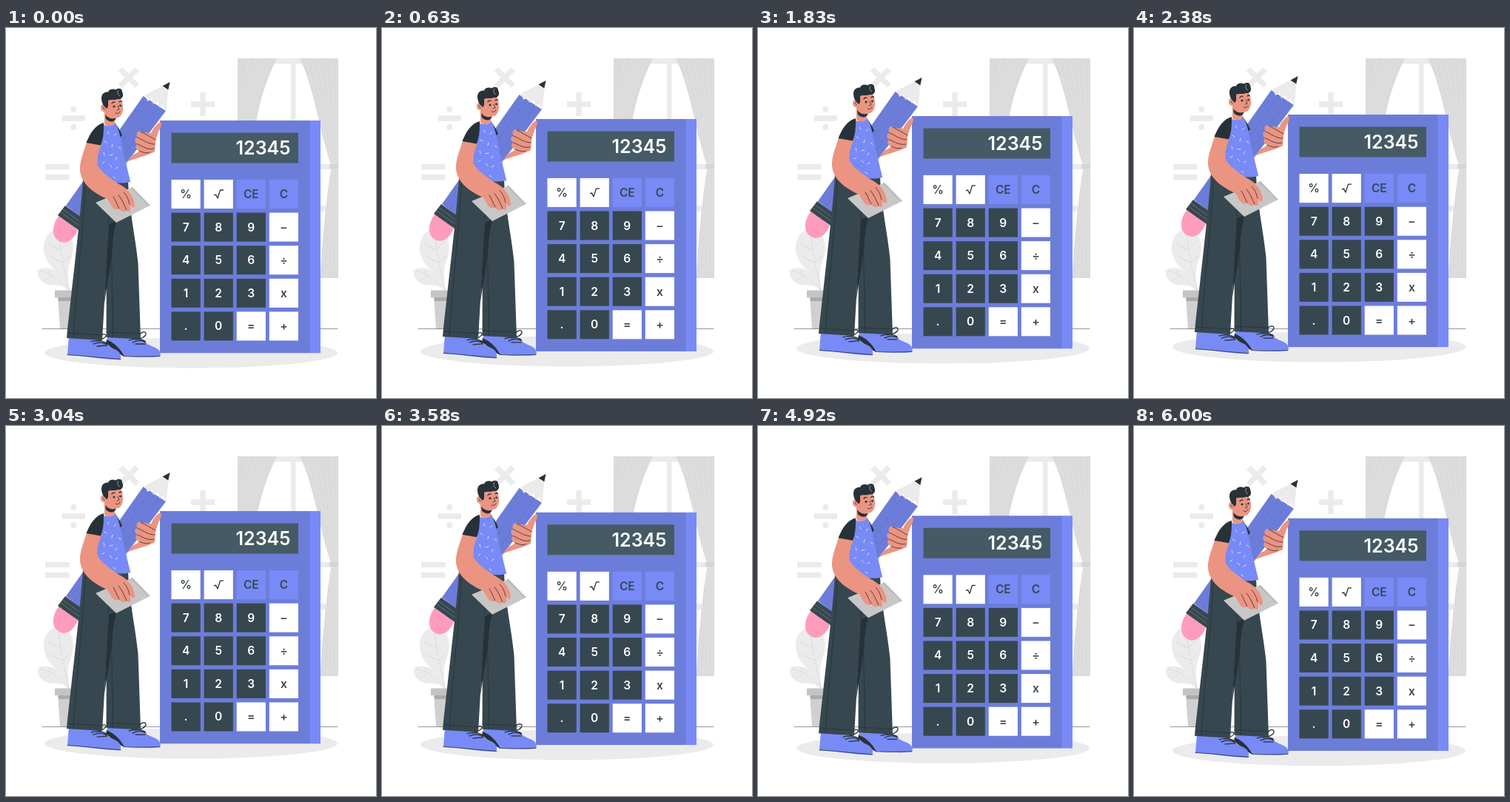
Animation, 500 px wide and 500 px high, one loop 6.04 s. Source, as an HTML page:

```html
<!DOCTYPE html>
<html lang="en">
<head>
<meta charset="utf-8">
<title>Calculator</title>
<style>
html, body { margin: 0; width: 100%; height: 100%; overflow: hidden; background: #fff; }
svg { display: block; width: 100vw; height: 100vh; }
text { font-family: Inter, Lato, sans-serif; font-weight: 600; }
.blue { fill: #788af6; } .shade { fill: #6c7dd9; }
.dark { fill: #37474f; } .ink { fill: #263238; }
.skin { fill: #eb9481; }
.line { fill: none; stroke: #263238; stroke-width: .8; stroke-linecap: round; stroke-linejoin: round; }
.thin { stroke-width: .5; } .bold { stroke-width: 1.3; }
.pale { fill: none; stroke: #e3e3e3; stroke-width: .8; }
.vein { fill: none; stroke: #d9d9d9; stroke-width: .8; }
</style>
</head>
<body>
<svg viewBox="0 0 500 500">
  <!-- window -->
  <path fill="#ebebeb" d="M360 41H400V48.500H391.500V126H385V48.500H360ZM424 240H436V248H424ZM424 184H449V191H424Z"/>
  <path fill="#dbdbdb" d="M313 41H366C354 65 343 96 338 128L330 180H313ZM397 41H449V338H425C427 293 433 225 440 187C426 151 416 78 397 41Z"/>
  <path class="pale" d="M361 42C346 66 336 98 331 130M354 42C341 68 331 100 326 130M346 42C334 68 326 100 322 130M337 42C328 70 322 100 318 130M328 42L316 115M404 42C419 82 428 150 441 187M412 42C425 82 431 150 443 187M421 42C430 82 436 150 444 187M430 42C436 82 440 150 446 187M440 42L448 187M441 188C436 230 431 290 429 337M443 188C440 235 436 290 434 337M445 188C443 235 441 290 440 337M447 188L445 337"/>
  <path fill="#d5d5d5" d="M437 184H449V190H437Z"/>

  <!-- signs on the wall -->
  <g stroke="#ebebeb" stroke-width="7.500" fill="#ebebeb">
    <path d="M154.500 56L177.500 78M177 55.500L154.500 78.500M250 103H282M266 87V119M75.500 122H107M53 187.500H85.500M53 201.500H85.500"/>
    <g stroke="none"><circle cx="91.300" cy="109.800" r="4"/><circle cx="91.300" cy="134" r="4"/></g>
  </g>

  <!-- plant -->
  <path fill="#ebebeb" d="M84 354C79 330 59 327 53 309C47 290 55 273 72 271C92 274 95 297 86 318C82 330 84 342 86 354Z"/>
  <path fill="#ebebeb" d="M84 354C77 345 63 350 52 345C44 341 41 331 44 326C58 321 74 328 80 341Z"/>
  <path class="vein" d="M71 277C73 304 80 330 85 355M73 300L57 291M74 299L86 287M77 317L59 309M77 317L88 306M46 328C61 331 76 342 84 354M60 334L58 327M62 335L54 340"/>
  <path fill="#d0d0d0" d="M70 362H99L97 406.500H73Z"/>
  <path fill="#ababab" d="M70 362H99V369H71Z"/>
  <path fill="#c4c4c4" d="M66 354.500H101V364H66Z"/>
  <path class="line thin" d="M49 406.500H448"/>

  <g id="rise">
    <ellipse cx="250" cy="439" rx="198" ry="20.500" fill="#ebebeb"/>

    <!-- calculator -->
    <path class="shade" d="M208 125H411V439.200H208Z"/>
    <path class="blue" d="M410.500 125H425V439.200H410.500Z"/>
    <path fill="#455a64" d="M223.500 141.500H395V182.500H223.500Z"/>
    <text x="384.500" y="171.200" font-size="25" text-anchor="end" fill="#fff">12345</text>
    <g id="keys"></g>
    <path class="line bold" d="M281.500 226L283.500 225L286 230L289.500 219H293.500"/>

    <!-- pencil -->
    <path fill="#ff9cbd" d="M73 252C64 261 61 276 67 284C75 293 88 293 97 273Z"/>
    <path class="shade" d="M185.500 92L216 112L105 259L81 240Z"/>
    <path fill="none" stroke="#6170c6" stroke-width=".7" d="M196 98L92 247M207 106L99 255"/>
    <path fill="#ebebeb" d="M187 91L212 78L219.500 83L216.500 112L212 104L207.500 107.500L205 99.500L199 103L197 95.500L191.500 99Z"/>
    <path class="ink" d="M221.500 73L211.500 78.300L219.300 83.500Z"/>
    <path class="dark" d="M80 240L106 259L98 273L70 253Z"/>
    <path fill="none" stroke="#6f7e85" stroke-width=".8" d="M77 245L103 264M74 249L100 268"/>

    <!-- shoes -->
    <path class="blue" d="M137 418H179C186 425 194 429 202 432C208 435 210 440 208 444C190 446 170 444 157 443L136 424Z"/>
    <path class="ink" d="M136 421C145 425 154 432 160 444L151 439L135 426Z"/>
    <path class="blue" d="M85 416L83 442C107 443 131 448 154 448.500C157 443 154 437 147 434C138 430 130 425 126 418Z"/>
    <path class="line" d="M83 441.500C107 443 130 446 155 447.500M159 443.500C175 444.500 193 444 208 443.500"/>
    <path class="line bold" d="M115 424C124 421 133 423 136 427M118 427C126 424 133 425 137 429M123 430L136 429M124 420C128 412 136 413 135 416C133 421 126 422 122 423M166 422C174 419 183 420 188 423M171 425C178 421 185 422 189 425M175 427L188 427M179 419C181 409 190 409 189 414C187 419 181 420 175 421"/>

    <!-- trousers -->
    <path class="dark" d="M134 206L165 207C166 244 175 283 178.500 318L182 420.500L135.500 418L136 300Z"/>
    <path class="ink" d="M137 258L149 262C142 287 144 315 137 345L133 372Z"/>
    <path class="dark" d="M104 205H164L166 248L146 262L139 265L130 422L82 419C95 300 100 260 104 205Z"/>
    <path class="line" d="M107 213C104 280 95 350 91 418M84 412L130 415M136 411L181 413M146 264C139 306 146 360 144 418M139 262V245"/>

    <!-- torso -->
    <path class="ink" d="M146 128C151 132 154 138 157 145L150 151Z"/>
    <path class="blue" d="M131 130C137 134 145 132 148 128C156 144 157 165 162 183L168 208C156 211 137 209 124 206L123 174Z"/>
    <path fill="none" stroke="#e5e9ff" stroke-width=".9" stroke-linecap="round" d="M137 140l2 3M146 145l3-2M133 153l3 2M144 157l-1 4M152 161l3 2M132 168l1 4M140 172l4-1M150 175l-2 3M157 185l1 4M130 183l3-2M140 185l3 3M148 190l3-2M135 198l-1 3M145 201l3 2M157 199l3-2M127 194l2 2"/>

    <!-- head -->
    <path class="skin" d="M133 108V130C138 134 145 132 147.500 128L146 122Z"/>
    <path class="ink" d="M134 117C138 122 144 124 149 121C147 128 140 128 135 123Z"/>
    <path class="skin" d="M136 98L154 94C158 100 159 108 157.500 113C156 120 151 122 146 122C141 121 136 118 134 113C129 114 127 109 128.500 105C131 102 134 103 136 106Z"/>
    <path class="ink" d="M132 105C127 96 128 86 138 86.500C139 82.500 145 81.500 148 83.500C152 80.500 157 81.500 157 86C160 93 156 97 151 96C146 98 141 96 138 98C138 103 139 107 136 109Z"/>
    <path fill="none" stroke="#fff" stroke-width=".5" d="M152 84C150 87 151 91 154 92"/>
    <path class="line bold" d="M143 102Q145 99 147 100.500M153 100Q155 98 156.500 99.500"/>
    <path class="line" d="M151 105L153 110L150 111M148 115Q152 117 154 113M131 107L133 110"/>
    <circle class="ink" cx="146" cy="106" r="1.500"/><circle class="ink" cx="154.500" cy="105" r="1.400"/>

    <!-- hand around the pencil -->
    <path class="skin" d="M163 181L172 171C175 170 178 168 180 166C174 164 174 158 178 157C172 153 174 148 178 148C174 142 179 136 185 141L196 142C199 135 205 128 209 127C211 130 209 135 206 140C205 144 203 148 202 153L201 167C193 172 181 174 163 181Z"/>
    <path class="line" d="M182 140C188 143 195 147 202 151M178 148C185 151 192 157 201 157M178 157C185 160 191 165 200 163M180 166C185 168 190 170 194 168"/>
    <path class="blue" d="M157 163L162 183L168 208H155Z"/>

    <!-- notepad -->
    <path fill="#c7c7c7" d="M121 236L171 215L194.500 240L149 263Z"/>
    <path fill="none" stroke="#a8a8a8" stroke-width="2.500" stroke-dasharray="1 1.500" d="M170 216L194 240"/>

    <!-- near arm -->
    <path class="skin" d="M110 151L130 156C125 166 122 178 124 186C130 196 140 202 151 210C163 216 171 223 174 238C174 244 171 244 167 238C170 247 167 251 163 246C160 250 155 248 153 244C149 248 144 244 141 238L137 231C124 226 105 214 101 198C97 184 105 169 110 151Z"/>
    <path class="line" d="M167 238C165 230 163 226 159 222M163 246C159 238 157 231 152 226M153 244C149 237 148 232 145 228"/>
    <path class="ink" d="M132 128C121 131 114 141 108.500 155L128 158.500C132 148 132 139 132 128Z"/>
  </g>
</svg>
<script>
const LOOP = 6040, LIFT = 10;
const rows = ["%,,CE,C", "7,8,9,–", "4,5,6,÷", "1,2,3,x", ".,0,=,+"];
const key = (label, c, r) => {
  const x = 223.5 + c * 44.1, y = 205 + r * 44.6;
  const soft = r === 0 && c > 1;
  const dark = r > 0 && c < 3 && label !== "=";
  const fill = soft ? "#788af6" : dark ? "#37474f" : "#fff";
  return `<rect x="${x}" y="${y}" width="39.2" height="39" fill="${fill}"/>
    <text x="${x + 19.6}" y="${y + 25}" font-size="15.5" text-anchor="middle" fill="${dark ? "#fff" : "#37474f"}">${label}</text>`;
};
document.getElementById("keys").innerHTML =
  rows.map((row, r) => row.split(",").map((label, c) => key(label, c, r)).join("")).join("");

const rise = document.getElementById("rise");
function draw(now) {
  const p = now % LOOP / LOOP;
  const up = 1 - Math.abs(2 * p - 1);
  rise.setAttribute("transform", `translate(0 ${-LIFT * up})`);
  requestAnimationFrame(draw);
}
draw(performance.now());
</script>
</body>
</html>
```
